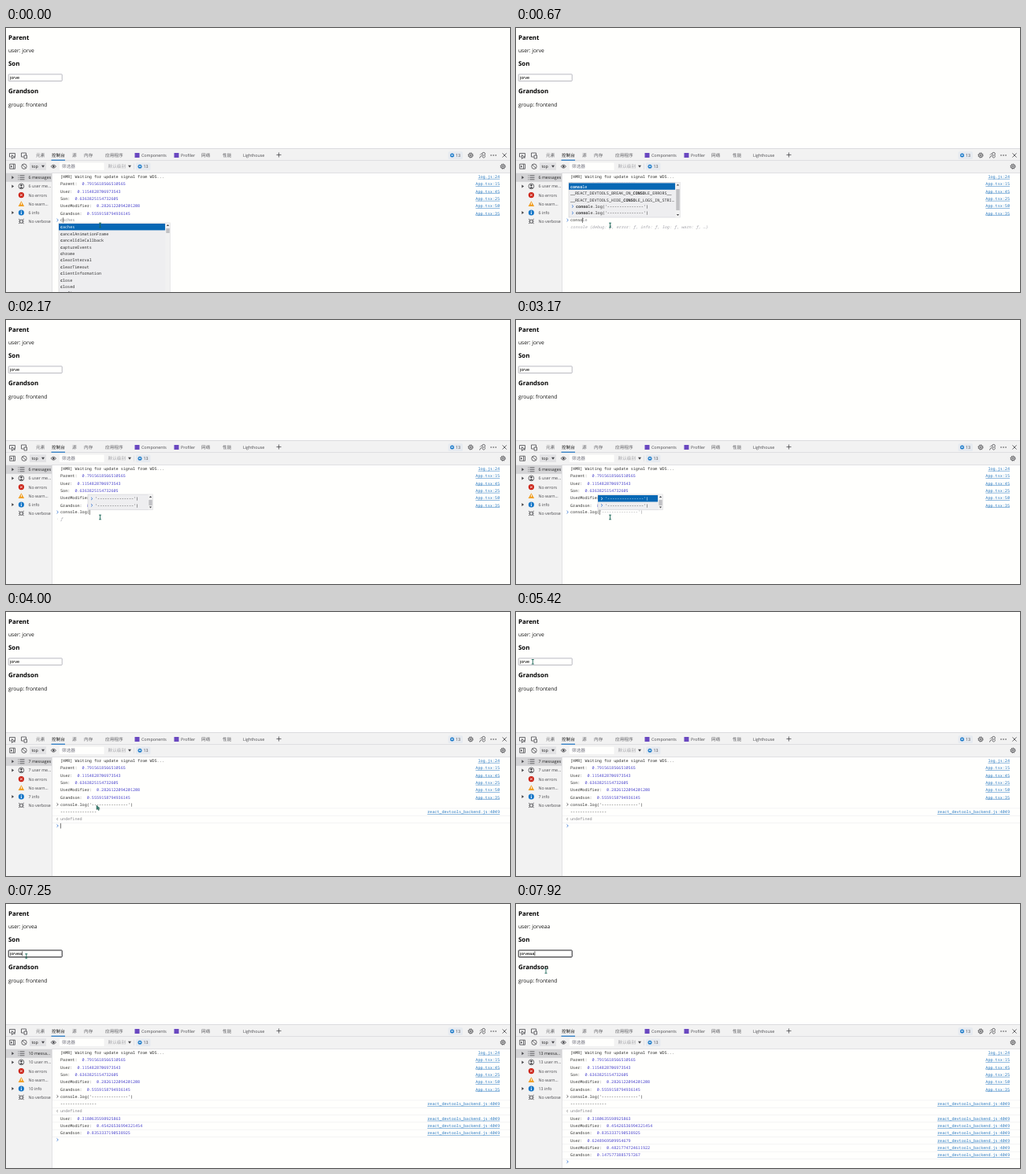
An HTML page that plays this animation: 640 by 336 pixels, repeating every 8000 ms.

```html
<!DOCTYPE html>
<html lang="en">
<head>
<meta charset="utf-8">
<title>Console demo</title>
<style>
  html, body { margin: 0; width: 100%; height: 100%; overflow: hidden; background: #fffffd; }
  svg { display: block; width: 640px; height: 336px; }
  text { white-space: pre; text-rendering: geometricPrecision; fill: #303030; }
  .ui { font: 5.3px "Open Sans", "Noto Sans CJK SC", "Noto Sans CJK", sans-serif; fill: #48484c; }
  .cjk { font: 5.65px "Noto Sans CJK SC", "Noto Sans CJK", sans-serif; fill: #5c5c60; }
  .mono { font: 5.12px "Noto Sans Mono", monospace; }
  .page { font: 6.7px "Open Sans", sans-serif; fill: #101010; }
  .head { font: bold 7.9px "Open Sans", sans-serif; fill: #000; }
  .field { font: 5.6px "Liberation Sans", sans-serif; fill: #000; }
  .link { fill: #2878c0; text-decoration: underline; }
  .num { fill: #4a44cc; }
  .dim { fill: #88888e; }
  .ital { font-style: italic; fill: #a4a4ac; }
  .light { fill: #fff; }
  .line { fill: none; stroke: #48484c; stroke-width: .8; }
  .line.light { stroke: #fff; }
  .blue { stroke: #2a6cd0; }
</style>
</head>
<body>
<svg viewBox="0 0 640 336"><g id="base"></g><g id="live"></g></svg>
<script>
const LOOP = 8000, FPS = 12, CH = 3.072, ROW = 9.32, TOP = 189;
const USER = 'jorve';
const DASH = "'" + '-'.repeat(15) + "')";
const PAGE = '#fffffd', BAR = '#f2f2f2', EDGE = '#d6d6da', DARK = '#444448';

const text = (x, y, s, cls, extra = '') => `<text x="${x}" y="${y}" class="${cls}" ${extra}>${s}</text>`;
const rect = (x, y, w, h, fill, extra = '') =>
  `<rect x="${x}" y="${y}" width="${w}" height="${h}" fill="${fill}" ${extra}/>`;
const path = (d, cls = 'line', extra = '') => `<path d="${d}" class="${cls}" ${extra}/>`;
const solid = (d, fill = DARK) => path(d, '', `fill="${fill}"`);
const disc = (x, y, r, fill) => `<circle cx="${x}" cy="${y}" r="${r}" fill="${fill}"/>`;
const ring = (x, y, r, extra = '') => `<circle cx="${x}" cy="${y}" r="${r}" class="line" ${extra}/>`;
const rowY = i => TOP + ROW * i;
const mono = (x, y, s, cls = '') => text(x, y + 1.9, s, 'mono ' + cls);
const logLine = (i, s) => mono(69, rowY(i), s.replace(/[\d.]+$/, '<tspan class="num">$&</tspan>'));
const chevron = (x, y, cls = 'line blue') => path(`M${x} ${y - 1.7}l1.8 1.7l-1.8 1.7`, cls);
const link = (i, s) => mono(627, rowY(i), s, 'link').replace('<text', '<text text-anchor="end"');
const gear = (x, y) => ring(x, y, 3.1, 'stroke-dasharray="1.4 1"') + ring(x, y, 2.5) + ring(x, y, 1);
const down = (x, y) => solid(`M${x} ${y - 1.2}h4l-2 3z`);
const within = (t, spans) => spans.some(([a, b]) => t >= a && t < b);
const latest = (list, t) => list.filter(e => e[0] <= t).pop();

function badge(x, y) {
  return rect(x, y - 4.7, 18.5, 9.6, '#e6eaf0', 'rx="1.5"') +
    disc(x + 5, y, 2.5, '#1878c8') + rect(x + 3.7, y - .7, 2.6, 1.2, '#fff') +
    text(x + 9.5, y + 1.9, '13', 'ui');
}

function tabs() {
  const cjk = [[38, '元素'], [58, '控制台'], [84, '源'], [99, '内存'], [126, '应用程序'], [248, '网络'], [275, '性能']];
  const latin = [[172, 'Components'], [222, 'Profiler'], [301, 'Lighthouse']];
  return rect(0, 153, 640, 31.3, BAR) + rect(0, 153, 640, .8, EDGE) +
    rect(0, 168.3, 640, .7, EDGE) + rect(0, 184, 640, .7, EDGE) +
    cjk.map(([x, s]) => text(x, 164, s, 'cjk', x === 58 ? 'style="fill:#181818"' : '')).join('') +
    latin.map(([x, s]) => text(x, 163.9, s, 'ui')).join('') +
    rect(57.5, 167.6, 17.5, 1.2, '#1870c0') +
    rect(163.5, 159, 6, 6, '#6a48c0') + rect(213.5, 159, 6, 6, '#6a48c0') +
    path('M343.5 161.5h6m-3-3v6') +
    path('M4.5 159.5h7v4.5h-2M4.5 159.5v4.5h2M7.5 161.5l4 3.5h-2.5l-1.5 1.5z') +
    path('M19.5 159h6v3M19.5 159v5h3M23 162h3.5v4h-3.5z') +
    badge(561.5, 162) + gear(590, 162) +
    ring(606.5, 160.3, 1.9) + path('M601.5 165.5c1-4 4-3 4-1c0 1 3 1 3-2M602 161.5l2-2') +
    [616, 619, 622].map(x => disc(x, 162, .8, DARK)).join('') +
    path('M630.4 159.4l5.2 5.2m0-5.2l-5.2 5.2');
}

function toolbar() {
  return path('M4.7 173.2h6.8v6h-6.8zM9.5 173.2v6') + solid('M6 174.7l2 1.5l-2 1.5z') +
    ring(23, 176.2, 3.2) + path('M20.8 174l4.4 4.4') +
    rect(30, 171.4, 21, 9.6, '#e2e2e4') + text(32.5, 178.1, 'top', 'ui', 'style="fill:#202020"') + down(45, 176) +
    path('M57 176.2q3.2-4 6.6 0q-3.4 4-6.6 0z') + disc(60.3, 176.2, 1.2, DARK) +
    rect(68, 171.4, 56.5, 9.6, PAGE) +
    text(71, 178.3, '筛选器', 'cjk', 'style="fill:#747480"') +
    text(129.5, 178.3, '默认级别', 'cjk', 'style="fill:#a4a4a8"') + down(155, 176) +
    rect(162, 172.5, .6, 7.5, EDGE) + badge(165, 176.2) + gear(631, 176.2);
}

function sidebar() {
  return rect(0, 184.6, 58.3, 152, BAR) + rect(0, 185, 58, 10.8, '#d4d4d6') + rect(58.1, 184.6, .7, 152, EDGE) +
    [190.3, 201.4, 235].map(y => solid(`M7.3 ${y - 2}l2.8 2l-2.8 2z`)).join('') +
    path('M17.5 187.8h6m-6 2.5h6m-6 2.5h6M15.5 187.8h.8m-.8 2.5h.8m-.8 2.5h.8') +
    ring(19.4, 201.4, 3.4) + disc(19.4, 200.3, 1.2, DARK) + solid('M17.2 204q2.2-3.6 4.4 0z') +
    disc(19.4, 212.6, 3.6, '#cc2418') + path('M18 211.2l2.8 2.8m0-2.8l-2.8 2.8', 'line light') +
    solid('M19.4 220.2l3.8 6.8h-7.6z', '#f0a028') + rect(19, 222.3, .9, 2.6, '#fff') +
    disc(19.4, 235, 3.6, '#1878c8') + rect(18.9, 234.4, 1, 2.6, '#fff') + rect(18.9, 232.7, 1, 1, '#fff') +
    path('M17.8 244.2h3.2v4h-3.2zM16 243l1.8 1.5m5-1.5l-1.8 1.5M16 246h1.8m3.2 0h1.8M16 249l1.8-1.5m5 1.5l-1.8-1.5') +
    text(28.5, 214.5, 'No errors', 'ui') + text(28.5, 225.8, 'No warn...', 'ui') + text(28.5, 247.6, 'No verbose', 'ui');
}

const firstLogs = [
  ['Parent:  0.7915618566510565', 15], ['User:  0.1154828706973543', 45], ['Son:  0.6363825154732605', 25],
  ['UserModifier:  0.2826122094201208', 50], ['Grandson:  0.5559158794936145', 35]];
const laterLogs = [
  'User:  0.3180635598925863', 'UserModifier:  0.45426536994321454', 'Grandson:  0.8353337190538925',
  'User:  0.6248969509954679', 'UserModifier:  0.4821774724611922', 'Grandson:  0.1475773885757267'];
const BACKEND = 'react_devtools_backend.js:4049';

const logs = () => mono(69, TOP, '[HMR] Waiting for update signal from WDS...') + link(0, 'log.js:24') +
  firstLogs.map(([s, n], i) => logLine(i + 1, s) + link(i + 1, 'App.tsx:' + n)).join('');

document.getElementById('base').innerHTML =
  rect(0, 0, 640, 336, PAGE) +
  text(3, 14.7, 'Parent', 'head') + text(3, 48.2, 'Son', 'head') + text(3, 83.2, 'Grandson', 'head') +
  text(3, 100.1, 'group: frontend', 'page') +
  tabs() + toolbar() + sidebar() + logs();

// Completion popup; rows that begin with '>' are history entries.
function popup({ x, y, w, rows, pre = '', sel = 0, thumb }) {
  const h = rows.length * 8.4 + 2.6;
  const mark = s => pre ? s.replace(new RegExp(pre, 'i'), '<tspan font-weight="bold">$&</tspan>') : s;
  let out = rect(x, y, w, h, '#eeeef0', 'stroke="#d0d0d4" stroke-width=".6"');
  rows.forEach((s, i) => {
    const cy = y + 5.4 + i * 8.4, old = s[0] === '>', on = i === sel;
    if (on) out += rect(x, cy - 4.4, w - (thumb ? 6.4 : 0), 8.4, '#0868b4');
    if (old) out += chevron(x + 4, cy, on ? 'line light' : 'line blue');
    out += mono(x + (old ? 9 : 1.9), cy, mark(s.slice(old ? 1 : 0)), on ? 'light' : '');
  });
  if (thumb) {
    const sx = x + w - 6;
    out += rect(sx, y, 6, h, '#f1f1f1') + rect(sx + .8, thumb[0], 4.4, thumb[1], '#c1c1c4') +
      solid(`M${sx + 1.4} ${y + 4}l1.6-2l1.6 2z`) + solid(`M${sx + 1.4} ${y + h - 4}l1.6 2l1.6-2z`);
  }
  return out;
}

const CALL = 'console.log(' + DASH;
const found = ['console', '__REACT_DEVTOOLS_BREAK_ON_CONSOLE_ERRORS__',
  '__REACT_DEVTOOLS_HIDE_CONSOLE_LOGS_IN_STRI…', '>' + CALL, '>' + CALL];
const below = (rows, pre) => ({ x: 67, y: 248, w: 141.5, rows, pre, thumb: [255, 6] });
const above = pre => ({ x: 67, y: 196.4, w: 141.5, rows: found, pre, thumb: [205, 27] });
const member = (rows, pre) => ({ x: 92, y: 248, w: 92, rows, pre });
const args = sel => ({ x: 104, y: 222, w: 82.5, rows: ['>' + DASH, '>' + DASH], sel, thumb: [229, 7] });
const preview = 'console {debug: ƒ, error: ƒ, info: ƒ, log: ƒ, warn: ƒ, …}';

// time, typed text, suggested rest, popup, evaluated preview
const typing = [
  [0, 'c', 'aches', below(['caches', 'cancelAnimationFrame', 'cancelIdleCallback', 'captureEvents', 'chrome',
    'clearInterval', 'clearTimeout', 'clientInformation', 'close', 'closed', 'confirm'], '^c')],
  [80, 'co', 'nfirm', below(['confirm', 'console', 'cookieStore', 'copy', 'count', ...found.slice(1)], 'co')],
  [250, 'con', 'firm', below(['confirm', 'console', 'const', 'continue', ...found.slice(1)], 'con')],
  [420, 'cons', 'ole', below(found, 'cons')],
  [670, 'conso', 'le', above('conso'), preview],
  [750, 'consol', 'e', above('consol'), preview],
  [830, 'console', '', above('console'), preview],
  [1080, 'console.', 'assert', member(['assert', 'clear', 'context', 'count', 'countReset', 'debug',
    'dir', 'dirxml', 'error', 'group', 'groupCollapsed'])],
  [1580, 'console.l', 'og', member(['log', 'clear', 'table', 'timeLog'], 'l'), 'ƒ log()'],
  [1750, 'console.lo', 'g', member(['log', 'timeLog'], 'lo'), 'ƒ log()'],
  [1830, 'console.log', '', member(['log', 'timeLog'], 'log'), 'ƒ log()'],
  [2000, 'console.log(', '', null, 'ƒ'],
  [2170, 'console.log(', '', args(-1), 'ƒ'],
  [2250, 'console.log(', '', args(-1)],
  [3080, 'console.log(', DASH, args(0)],
  [3580, CALL, '', null],
  [3830, '', '', null]];

const mouse = [[0, 119.5, 251], [3750, 119.5, 251], [3920, 115, 246], [4500, 115, 246], [4670, 114, 245],
  [4850, 114, 245], [5420, 21.3, 63.3], [5670, 21.3, 63.3], [5920, 25.8, 66.3], [7420, 25.8, 66.3],
  [7920, 38, 85.3], [LOOP, 38, 85.3]];

function pointer(t) {
  const i = mouse.findIndex(m => m[0] > t);
  const [t0, x0, y0] = mouse[i - 1], [t1, x1, y1] = mouse[i];
  const p = (t - t0) / (t1 - t0), e = p * p * (3 - 2 * p);
  const x = x0 + (x1 - x0) * e, y = y0 + (y1 - y0) * e;
  return within(t, [[3830, 5330]])
    ? path(`M${x} ${y}v5.6l1.4-1.2l1 2l1-.5l-1-1.9h1.8z`, '', 'fill="#3c8878" stroke="#1c4840" stroke-width=".5"')
    : path(`M${x - 1.5} ${y - 2.8}h3m-1.5 0v5.6m-1.5 0h3`, 'line', 'style="stroke:#1c6858;stroke-width:.9"');
}

function field(t) {
  const name = USER + (t >= 7420 ? 'aa' : t >= 6170 ? 'a' : '');
  const focus = t >= 5580;
  const end = 5 + 12.2 + 3.12 * (name.length - USER.length);
  return text(3, 30.8, 'user: ' + name, 'page') +
    rect(3.2, 58.9, 68, 8.6, PAGE, focus
      ? 'rx=".6" stroke="#202024" stroke-width="1"' : 'rx=".6" stroke="#9c9ca8" stroke-width=".7"') +
    text(5, 65.2, name, 'field') +
    (focus && !within(t, [[6670, 7250]]) ? rect(end + .2, 60.3, .6, 5.8, '#000') : '');
}

function counts(t) {
  const n = t < 3830 ? 6 : t < 6170 ? 7 : t < 7420 ? 10 : 13;
  const big = n > 9;
  return text(28.5, 192.2, n + (big ? ' messa...' : ' messages'), 'ui', 'style="fill:#202020"') +
    text(28.5, 203.4, n + (big ? ' user m...' : ' user me...'), 'ui') +
    text(28.5, 236.9, n + ' info', 'ui');
}

function output(t) {
  if (t < 3830) return '';
  const n = t >= 7420 ? 6 : t >= 6170 ? 3 : 0;
  const rules = Array.from({ length: n + 3 }, (_, i) => rect(59, rowY(6.5 + i), 581, .6, '#ececee')).join('');
  return rules + chevron(64.5, rowY(6), 'line') + mono(69, rowY(6), CALL) +
    mono(69, rowY(7), '-'.repeat(15)) + link(7, BACKEND) +
    path(`M66 ${rowY(8) - 1.5}l-1.6 1.5l1.6 1.5`, 'line', 'opacity=".6"') + mono(69, rowY(8), 'undefined', 'dim') +
    laterLogs.slice(0, n).map((s, i) => logLine(9 + i, s) + link(9 + i, BACKEND)).join('');
}

function prompt(t) {
  const [, typed, rest, box, result] = latest(typing, t);
  const row = t < 3830 ? 6 : t < 6170 ? 9 : t < 7420 ? 12 : 15;
  const y = rowY(row) - (row > 6 ? .8 : .4);
  const caret = within(t, [[0, 2670], [3080, 4420], [4920, 5420]]);
  return chevron(64.5, y) + mono(69, y, typed) + mono(69 + typed.length * CH, y, rest, 'dim') +
    (result ? disc(65.3, y + 8.6, .4, '#a4a4ac') + mono(69, y + 8.4, result, 'ital') : '') +
    (caret ? rect(69 + typed.length * CH, y - 3.2, .6, 6.6, '#202020') : '') +
    (box ? popup(box) : '');
}

const live = document.getElementById('live');
let shown = -1;
function tick() {
  const step = Math.floor((performance.now() % LOOP + 4) * FPS / 1000) % (LOOP * FPS / 1000);
  if (step !== shown) {
    shown = step;
    const t = Math.floor(step * 1000 / FPS) + 4;
    live.innerHTML = field(t) + counts(t) + output(t) + prompt(t) + pointer(t);
  }
  requestAnimationFrame(tick);
}
tick();
</script>
</body>
</html>
```
